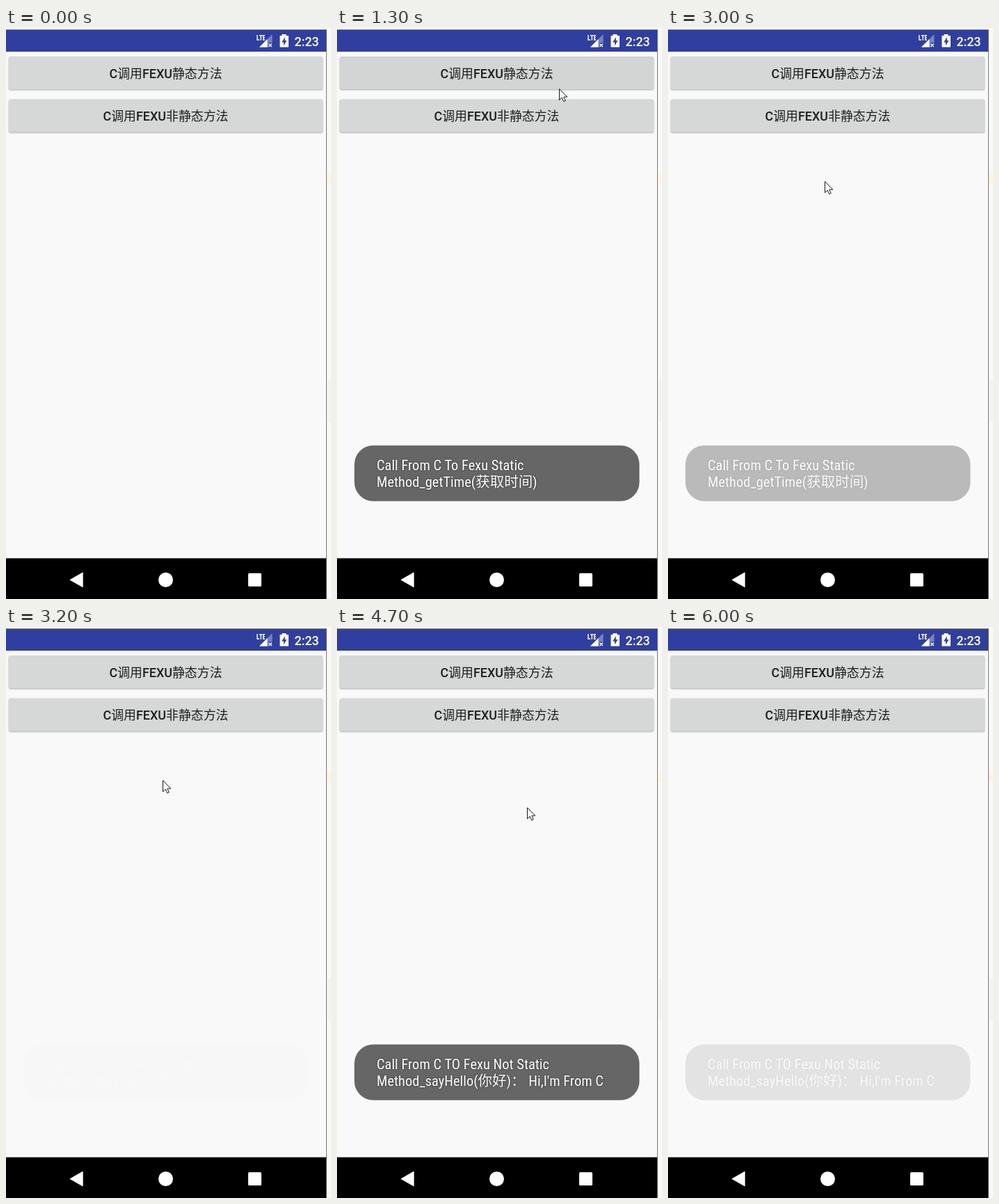
Animation, 467 px wide and 820 px high, one loop 6.1 s. Source, as an HTML page:

```html
<!DOCTYPE html>
<html lang="zh">
<head>
<meta charset="utf-8">
<title>Button demo</title>
<style>
  html, body { margin: 0; width: 100%; height: 100%; overflow: hidden; background: #f9f9f9; }
  svg { display: block; width: 467px; height: 820px; }
  text { font-family: Roboto, "Noto Sans CJK SC", "Noto Sans CJK", sans-serif; }
  .face { fill: #d6d7d7; filter: drop-shadow(0 1px 1px rgba(0, 0, 0, .32)); }
  .label { font-size: 17.92px; font-weight: 500; fill: #1e1e1e; text-anchor: middle; }
  .label tspan { font-weight: 400; }
  .clock { font-size: 17.92px; font-weight: 500; }
  .toast text {
    font-family: "Roboto Condensed", Roboto, "Noto Sans CJK SC", "Noto Sans CJK", sans-serif;
    font-size: 20.48px; font-stretch: 75%; fill: #fff;
    text-shadow: 0 0 2.5px rgba(0, 0, 0, .55);
  }
  .toast tspan { font-family: "Noto Sans CJK TC", "Noto Sans CJK", sans-serif; }
</style>
</head>
<body>
<svg viewBox="0 0 467 820">
  <defs>
    <rect id="face" x="4" y="41" width="451" height="47" rx="2.5"/>
    <rect id="bubble" x="25" y="599.5" width="409.500" height="80" rx="27" fill="#666"/>
    <clipPath id="inside"><use href="#face"/></clipPath>
  </defs>
  <rect width="467" height="820" fill="#f9f9f9"/>
  <rect x="461" y="208" width="6" height="15" fill="#fdf5df"/>
  <rect x="462" y="505" width="5" height="60" fill="#f3f3f3"/>
  <rect y="2" width="461" height="1" fill="#777"/>
  <rect y="3" width="460" height="31" fill="#303f9f"/>
  <rect x="460" y="2" width="1" height="818" fill="#777"/>

  <g fill="#fff">
    <path d="M361 10V17H364M364 10.700H368.500M366.300 10.700V17.700M372 10.700H369.700V17H372M369.700 13.800H371.700" fill="none" stroke="#fff" stroke-width="1.4"/>
    <path d="M364 27.500L382.500 9V21H377V27.500Z" opacity=".35"/>
    <path d="M364 27.500L375.500 16V27.500Z"/>
    <path d="M377.500 22.500L382 27M382 22.500L377.500 27" stroke="#fff" stroke-width="1.4"/>
    <path d="M396.500 9h6v2h3.500v16.500h-12.500v-16.500h3z"/>
    <path d="M400.800 13L396.200 20.500H399V25.500L403.400 18H400.800Z" fill="#303f9f"/>
    <text class="clock" x="414.500" y="25.500">2:23</text>
  </g>

  <g>
    <use class="face" href="#face"/>
    <g class="press" clip-path="url(#inside)"><rect width="460" height="100"/><circle cy="64"/></g>
    <text class="label" x="229.500" y="71.500">C<tspan>调用</tspan>FEXU<tspan>静态方法</tspan></text>
  </g>
  <g transform="translate(0 61.500)">
    <use class="face" href="#face"/>
    <g class="press" clip-path="url(#inside)"><rect width="460" height="100"/><circle cy="64"/></g>
    <text class="label" x="229.500" y="71.500">C<tspan>调用</tspan>FEXU<tspan>非静态方法</tspan></text>
  </g>

  <g class="toast">
    <use href="#bubble"/>
    <text x="57" y="635">Call From C To Fexu Static</text>
    <text x="57" y="659">Method_getTime(获取时间)</text>
  </g>
  <g class="toast">
    <use href="#bubble"/>
    <text x="57" y="635">Call From C TO Fexu Not Static</text>
    <text x="57" y="659">Method_sayHello(你好)<tspan>：</tspan> Hi,I'm From C</text>
  </g>

  <rect y="761.500" width="460" height="58.500"/>
  <g fill="#fff">
    <path d="M92.500 792.500L110 782.500V802.500Z" stroke="#fff" stroke-width="1.4" stroke-linejoin="round"/>
    <circle cx="229.500" cy="792.500" r="10.5"/>
    <rect x="348" y="783" width="19" height="19" rx="1.500"/>
  </g>

  <path id="cursor" d="M.5 .5V16.500L4.200 13L6.700 18.500L9.200 17.400L6.800 12H11.800Z" fill="#fff" stroke="#16161e"/>
</svg>
<script>
const LOOP = 6100, STEP = 100;
const FADE = 500, SHOWN = 1912;   // toast fade time, delay until it fades out
const PRESS = 600, SPEED = .6;    // press time, ripple growth in px per ms

const clicks = [
  { press: 800, toast: 813, x: 303 },
  { press: 3700, toast: 3713, x: 253 }
];
const entry = { x: 379, y: 69 };
const moves = [
  { from: 300, to: 600, x: 303, y: 67 },
  { from: 800, to: 1000, x: 317, y: 78 },
  { from: 1000, to: 1400, x: 319, y: 90 },
  { from: 1500, to: 1900, x: 225, y: 220 },
  { from: 3300, to: 3700, x: 253, y: 117 },
  { from: 3700, to: 4000, x: 273, y: 259 },
  { from: 5100, to: 5400, x: 357, y: 235 }
];

const toasts = document.querySelectorAll(".toast");
const presses = document.querySelectorAll(".press");
const cursor = document.getElementById("cursor");

const progress = (t, start, length) => Math.min(1, Math.max(0, (t - start) / length));
const ease = p => (1 - Math.cos(Math.PI * p)) / 2;
const mix = (a, b, p) => a + (b - a) * p;

function pointer(t) {
  return moves.reduce((at, m) => {
    const p = progress(t, m.from, m.to - m.from);
    return { x: mix(at.x, m.x, p), y: mix(at.y, m.y, p) };
  }, entry);
}

function draw(t) {
  const { x, y } = pointer(t);
  cursor.setAttribute("transform", `translate(${Math.round(x)} ${Math.round(y)})`);
  cursor.style.display = t >= 300 && t < 5700 ? "" : "none";

  clicks.forEach((click, i) => {
    const shown = ease(progress(t, click.toast, FADE));
    const gone = ease(progress(t, click.toast + SHOWN, FADE));
    toasts[i].style.opacity = shown - gone;

    // Quick rise, slow fall, peaking at a third of the press
    const p = progress(t, click.press, PRESS);
    const tint = .05 * 6.75 * p * (1 - p) ** 2;
    const [shade, ripple] = presses[i].children;
    shade.style.opacity = tint;
    ripple.style.opacity = tint * .6;
    ripple.setAttribute("r", p * PRESS * SPEED);
    ripple.setAttribute("cx", mix(click.x, 230, p));
  });
}

function tick() {
  const t = performance.now() % LOOP;
  draw(Math.floor(t / STEP) * STEP);
  requestAnimationFrame(tick);
}
tick();
</script>
</body>
</html>
```
